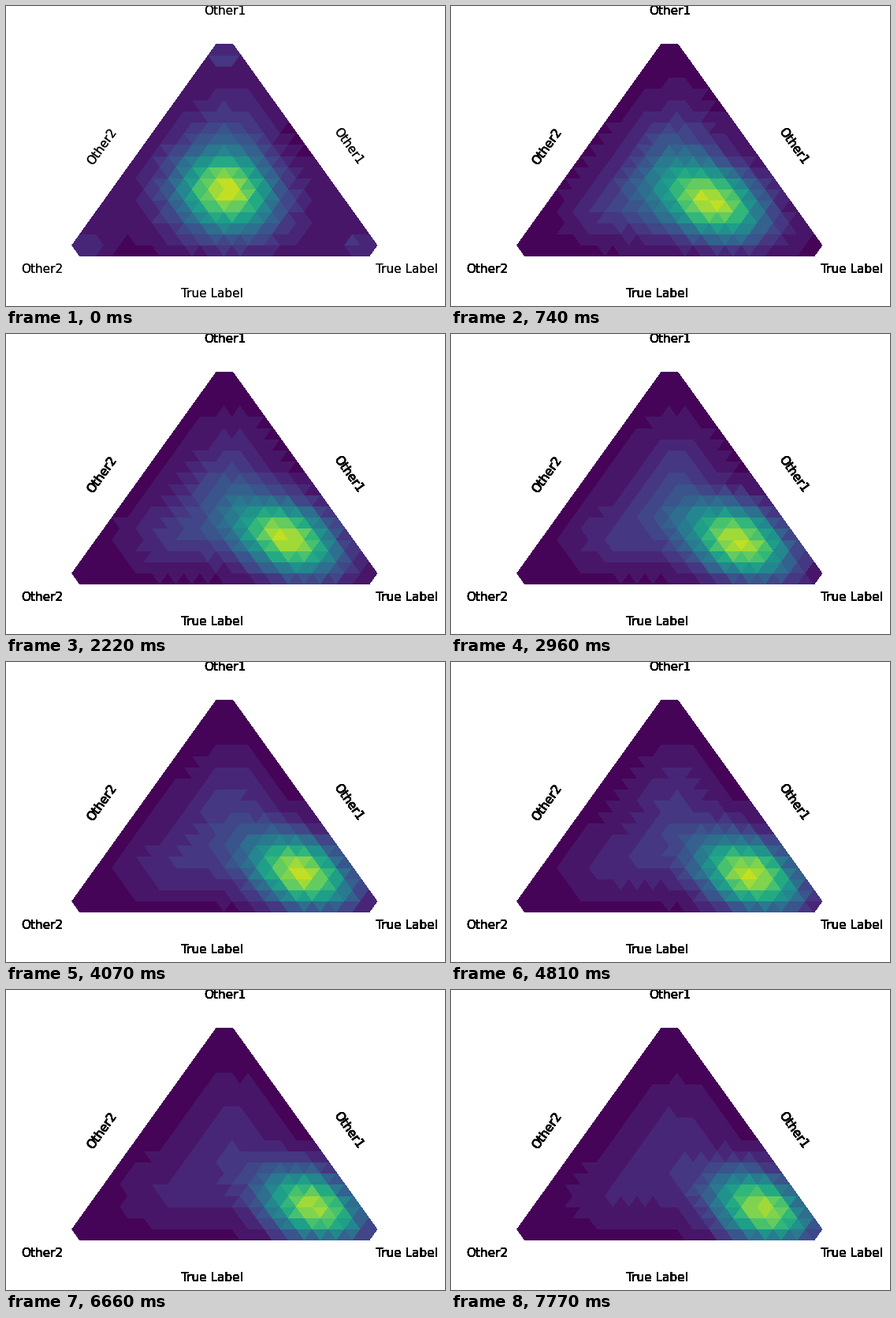
Recreate the animation shown at these times as a matplotlib script. Size 557 by 381 pixels, loop 8 s.

```python
import numpy as np
import matplotlib.pyplot as plt
from matplotlib.animation import FuncAnimation
from matplotlib.collections import PolyCollection

W, H, DPI = 557, 381, 100
N = 20                                  # cells along one side
CX, BASE, DX, DY = 277.3, 318, 20.35, 14.2
STEP, HOLD, LOOP = 40, 370, 8000
LEVELS, LAYERS = 20, 9

pts = [(r, c) for r in range(N + 1) for c in range(N + 1 - r)]
index = {p: i for i, p in enumerate(pts)}
row, col = np.array(pts).T
X = CX + (col - (N - row) / 2) * DX
Y = BASE - row * DY
depth = np.minimum(np.minimum(row, col), N - row - col)
corners = {(0, 0), (0, N), (N, 0)}
near_corners = [index[p] for p in [(1, 1), (1, N - 2), (N - 2, 1)]]


def triangles():
    for r, c in pts:
        if r + c < N:
            yield (r, c), (r, c + 1), (r + 1, c)
        if r + c < N - 1:
            yield (r, c + 1), (r + 1, c), (r + 1, c + 1)


tris = np.array([[index[p] for p in t] for t in triangles()
                 if not corners & set(t)])


def bump(x, y, sx, sy, tilt=0):
    u, v = (X - x) / sx, (Y - y) / sy
    return np.exp(-(u * u + v * v - 2 * tilt * u * v) / (2 * (1 - tilt ** 2)))


def density(k):
    """Vertex values: a peak drifting to the right corner over fading arms."""
    early = np.exp(-k)
    floor = .05 * early ** 2
    mid = .09 + .33 * np.exp(-k / 6) - .28 * early ** 2
    top = .15 * np.exp(-k / 25)
    left = top * (1 - .5 * early)

    d = bump(281 + 46.2 * k ** .3, 236 + 11.2 * k ** .43,
             44 - 3 * early, 32 + 3 * early, .34 - .2 * early)
    d += mid * bump(275, 225, 50, 42)
    d += top * bump(287, 160, 30, 36) + left * bump(203, 262, 38, 25)
    d += floor * (1 - bump(170, 280, 28, 35) - bump(370, 165, 28, 40))
    d *= np.where(depth == 0, .65, 1)
    d[near_corners] += .34 * max(0, 1 - k / 1.6)
    d = np.clip(d, 0, None)
    return d / d.max() * (.94 - .0025 * k)


def colours(k):
    v = density(k)[tris].mean(axis=1)
    return plt.cm.viridis(np.round(v * LEVELS) / LEVELS + .008)


fig = plt.figure(figsize=(W / DPI, H / DPI), dpi=DPI, facecolor="white")
ax = fig.add_axes([0, 0, 1, 1])
ax.set_xlim(0, W)
ax.set_ylim(H, 0)
ax.axis("off")

cells = PolyCollection(np.column_stack([X, Y])[tris], linewidths=0,
                       antialiaseds=False)
ax.add_collection(cells)
layers = [[] for _ in range(LAYERS)]


def label(x, y, text, angle=0, va="baseline"):
    for layer in layers:                # repeated prints darken the edges
        layer.append(ax.text(x, y, text, size=11, family="DejaVu Sans",
                             ha="center", va=va, rotation=angle))


label(277.3, 11, "Other1")
label(45.6, 339, "Other2")
label(508.3, 339, "True Label")
label(261.4, 370, "True Label")
label(121.8, 179, "Other2", 54.4, "center")
label(433.8, 178, "Other1", -54.4, "center")


def draw(i):
    k = (i * STEP + 30) // HOLD
    cells.set_facecolor(colours(k))
    for n, layer in enumerate(layers):
        for text in layer:
            text.set_visible(n < 2 + 2 * k)
    return cells,


anim = FuncAnimation(fig, draw, frames=LOOP // STEP, interval=STEP,
                     repeat=True, repeat_delay=0)
plt.show()
```
